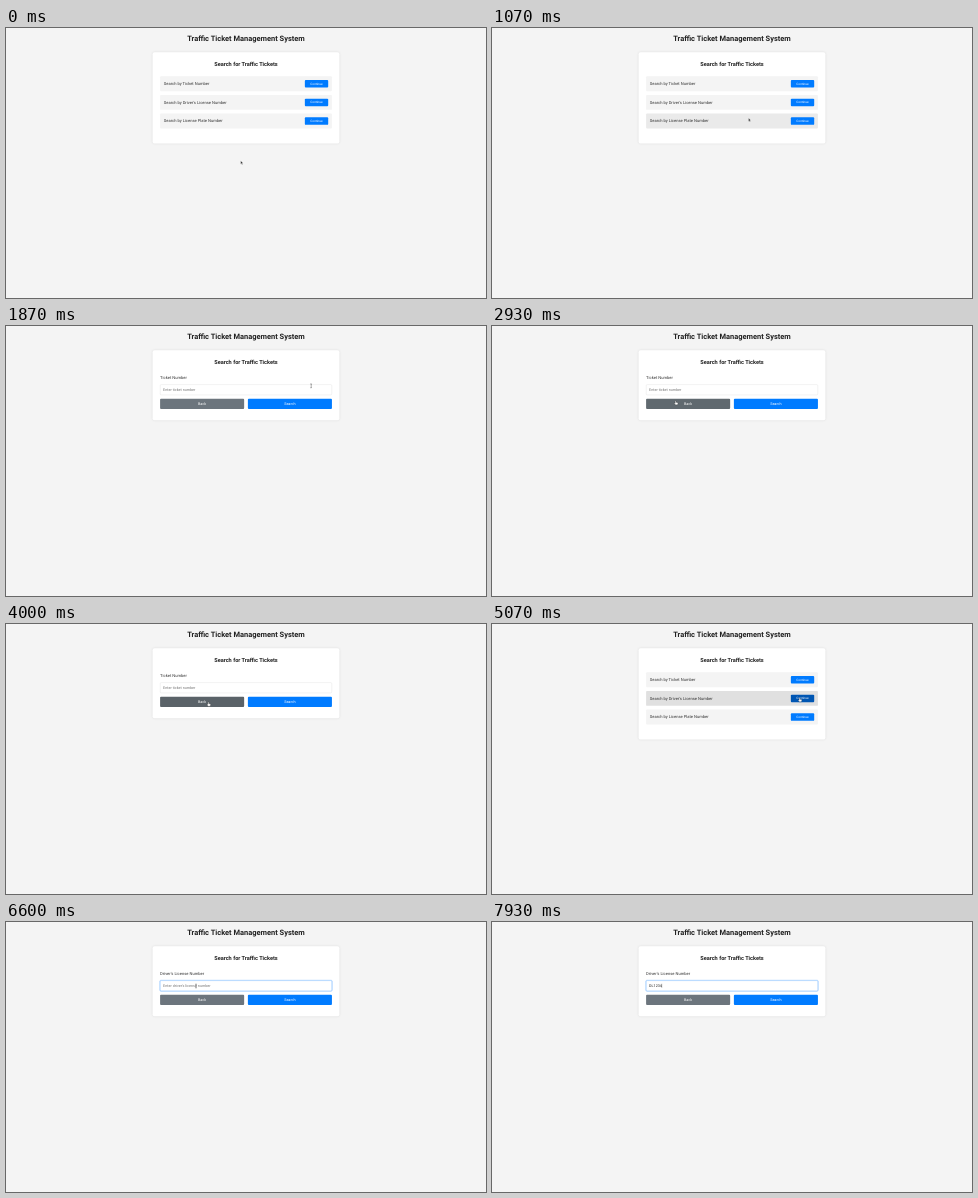
Animation, 480 px wide and 270 px high, one loop 8 s. Source, as an HTML page:

```html
<!DOCTYPE html>
<html lang="en">
<head>
<meta charset="utf-8">
<title>Ticket search</title>
<style>
  html, body { margin: 0; width: 100%; height: 100%; overflow: hidden; background: #f4f4f4; }
  svg { display: block; width: 100vw; height: 100vh; }
  text { font-family: Roboto, Arial, sans-serif; fill: #333; text-rendering: geometricPrecision; white-space: pre; }
  .card { fill: #fff; filter: drop-shadow(0 .9px .95px rgba(0, 0, 0, .1)); }
</style>
</head>
<body>
<svg id="stage" viewBox="0 0 480 270"></svg>
<script>
const LOOP = 8000;
const REM = 3.736;
const LEFT = 154.1, WIDTH = 171.8, HALF = 84.05;
const stage = document.getElementById('stage');

function add(parent, tag, attrs, content) {
  const node = document.createElementNS('http://www.w3.org/2000/svg', tag);
  set(node, attrs);
  if (content) node.textContent = content;
  parent.appendChild(node);
  return node;
}
function set(node, attrs) {
  for (const key in attrs) node.setAttribute(key, attrs[key]);
}
const show = (node, on) => node.setAttribute('visibility', on ? 'visible' : 'hidden');

const box = (parent, x, y, width, height, fill, rx = 0.93) =>
  add(parent, 'rect', { x, y, width, height, fill, rx });

// Text is placed by the vertical centre of its line.
const label = (parent, x, middle, size, content, attrs = {}) =>
  add(parent, 'text', { x, y: middle + size * 0.342, 'font-size': size, ...attrs }, content);
const centred = { 'text-anchor': 'middle' };

function button(parent, x, y, width, height, size, fill, content) {
  const face = box(parent, x, y, width, height, fill);
  label(parent, x + width / 2, y + height / 2, size, content, { ...centred, style: 'fill:#fff' });
  return face;
}

// Static page
box(stage, 0, 0, 480, 270, '#f4f4f4', 0);
label(stage, 240, 10.9, 2 * REM, 'Traffic Ticket Management System',
  { ...centred, 'font-weight': 700, style: 'fill:#222' });
const card = add(stage, 'rect', { x: 146.6, y: 24.3, width: 186.8, rx: 1.87, class: 'card' });
label(stage, 240, 36.25, 1.5 * REM, 'Search for Traffic Tickets',
  { ...centred, 'font-weight': 700, style: 'fill:#222' });

// Menu view
const menu = add(stage, 'g');
const rows = ['Ticket Number', "Driver's License Number", 'License Plate Number'].map((name, i) => {
  const y = 48.25 + i * 5 * REM;
  const face = box(menu, LEFT, y, WIDTH, 4 * REM, '#f4f4f4');
  label(menu, LEFT + REM, y + 2 * REM, 1.1 * REM, 'Search by ' + name);
  return { face, button: button(menu, 298.85, y + REM, 23.35, 2 * REM, REM / 1.2, '#007bff', 'Continue') };
});

// Form view
const form = add(stage, 'g');
const title = label(form, LEFT, 51.4, 1.1 * REM, ' ');
const glow = box(form, LEFT - 0.4, 58.2, WIDTH + 0.8, 11.1, 'none', 1.2);
set(glow, { stroke: '#007bff', 'stroke-width': 0.9, 'stroke-opacity': 0.22 });
const field = box(form, LEFT + 0.12, 58.6, WIDTH - 0.24, 10.3, '#fff');
set(field, { 'stroke-width': 0.24 });
const entry = label(form, 157.1, 63.85, REM, ' ');
const caret = box(form, 157, 61.7, 0.25, 4.3, '#222', 0);
const back = button(form, LEFT, 72.7, HALF, 10.3, REM, '#6c757d', 'Back');
const search = button(form, LEFT + HALF + REM, 72.7, HALF, 10.3, REM, '#007bff', 'Search');

// Pointers, each with its hot spot at 0,0
const pointer = add(stage, 'g');
const outline = { fill: '#222', stroke: '#fff', 'stroke-width': 0.35, 'stroke-linejoin': 'round' };
const shapes = {
  arrow: add(pointer, 'path', { ...outline, d: 'M0 0V3.4L.8 2.7 1.3 3.9 1.9 3.6 1.4 2.5H2.5Z' }),
  hand: add(pointer, 'path', {
    ...outline, fill: '#fff', stroke: '#222', 'stroke-width': 0.25,
    d: 'M-.4 .3Q0-.3 .4 .3V1.6L2 2Q2.4 2.2 2.3 2.8L1.9 4.2H-.2L-1.4 2.6Q-1.2 2-.4 2.6Z'
  }),
  beam: add(pointer, 'path', {
    fill: 'none', stroke: '#333', 'stroke-width': 0.4,
    d: 'M-.8-2Q0-2 0-1.5 0-2 .8-2M0-1.6V1.6M-.8 2Q0 2 0 1.5 0 2 .8 2'
  })
};

// Timeline
const OPEN_TICKET = 1670, GO_BACK = 4130, OPEN_LICENSE = 5130, FOCUS = 5930;
const TYPED = 'DL1234';
const KEYS = [7070, 7270, 7470, 7600, 7730, 7870];
const path = [
  [0, 234.7, 132.8], [700, 234.7, 132.8], [870, 240, 118], [1070, 256.3, 90.2],
  [1270, 296, 66], [1400, 319, 57], [1530, 311, 55.5], [1670, 309, 56],
  [1870, 305.2, 59.8], [2230, 305.2, 59.8], [2500, 262, 64], [2800, 188, 72],
  [3070, 179, 77.5], [3630, 179, 77.5], [3930, 202.3, 78], [4170, 202.3, 78],
  [4500, 250, 77], [4870, 307.5, 73.6], [5270, 307.5, 73.6], [5400, 286, 80],
  [5530, 243.5, 69.8], [5800, 198, 65], [6000, 190, 64], [LOOP, 190, 64]
];
const hovers = {
  row0: [1300, OPEN_TICKET], row1: [GO_BACK, OPEN_LICENSE], row2: [970, 1160],
  button0: [1370, OPEN_TICKET], button1: [4830, OPEN_LICENSE],
  back: [2800, GO_BACK], search: [OPEN_LICENSE, 5450]
};

const clamp = v => Math.max(0, Math.min(1, v));
const mix = (a, b, k) => a + (b - a) * k;

function position(t) {
  const i = Math.max(1, path.findIndex(p => p[0] > t));
  const [a, b] = [path[i - 1], path[i]];
  const k = (t - a[0]) / (b[0] - a[0]);
  return [mix(a[1], b[1], k), mix(a[2], b[2], k)];
}
function hover(name, t, fade = 200) {
  const [start, end] = hovers[name] || [LOOP, LOOP];
  return Math.min(clamp((t - start) / fade), 1 - clamp((t - end) / fade));
}
function tint(node, from, to, k) {
  node.setAttribute('fill', `rgb(${from.map((v, i) => Math.round(mix(v, to[i], k)))})`);
}
const BLUE = [0, 123, 255], DEEP_BLUE = [0, 86, 179];

function pointerShape(x, y, inMenu) {
  const over = (left, top, width, height) =>
    x > left && x < left + width && y > top && y < top + height;
  if (inMenu) {
    return rows.some((_, i) => over(298.85, 52 + i * 5 * REM, 23.35, 7.5)) ? 'hand' : 'arrow';
  }
  if (over(LEFT, 58.5, WIDTH, 10.5)) return 'beam';
  return over(LEFT, 72.7, HALF, 10.3) || over(LEFT + HALF + REM, 72.7, HALF, 10.3) ? 'hand' : 'arrow';
}

function render(t) {
  const inMenu = t < OPEN_TICKET || (t >= GO_BACK && t < OPEN_LICENSE);
  const license = t >= OPEN_LICENSE;
  menu.style.display = inMenu ? '' : 'none';
  form.style.display = inMenu ? 'none' : '';
  card.setAttribute('height', inMenu ? 91.1 : 69.9);

  rows.forEach((row, i) => {
    tint(row.face, [244, 244, 244], [224, 224, 224], hover('row' + i, t));
    tint(row.button, BLUE, DEEP_BLUE, hover('button' + i, t));
  });
  tint(back, [108, 117, 125], [90, 98, 104], hover('back', t));
  tint(search, BLUE, DEEP_BLUE, hover('search', t, 110));

  const focused = t >= FOCUS;
  const typed = TYPED.slice(0, KEYS.filter(k => k <= t).length);
  title.textContent = license ? "Driver's License Number" : 'Ticket Number';
  entry.textContent = typed || (license ? "Enter driver's license number" : 'Enter ticket number');
  entry.style.fill = typed ? '#222' : '#757575';
  field.setAttribute('stroke', focused ? '#007bff' : '#ccc');
  glow.style.display = focused ? '' : 'none';

  const lastKey = Math.max(FOCUS, ...KEYS.filter(k => k <= t));
  caret.style.display = focused && (t - lastKey) % 1000 < 500 ? '' : 'none';
  caret.setAttribute('x', 157 + (typed && !inMenu ? entry.getComputedTextLength() : 0));

  const [x, y] = position(t);
  const shape = pointerShape(x, y, inMenu);
  pointer.setAttribute('transform', `translate(${x} ${y})`);
  for (const name in shapes) show(shapes[name], name === shape && t < KEYS[0]);
}

const start = performance.now();
function tick() {
  render((performance.now() - start) % LOOP);
  requestAnimationFrame(tick);
}
tick();
</script>
</body>
</html>
```
